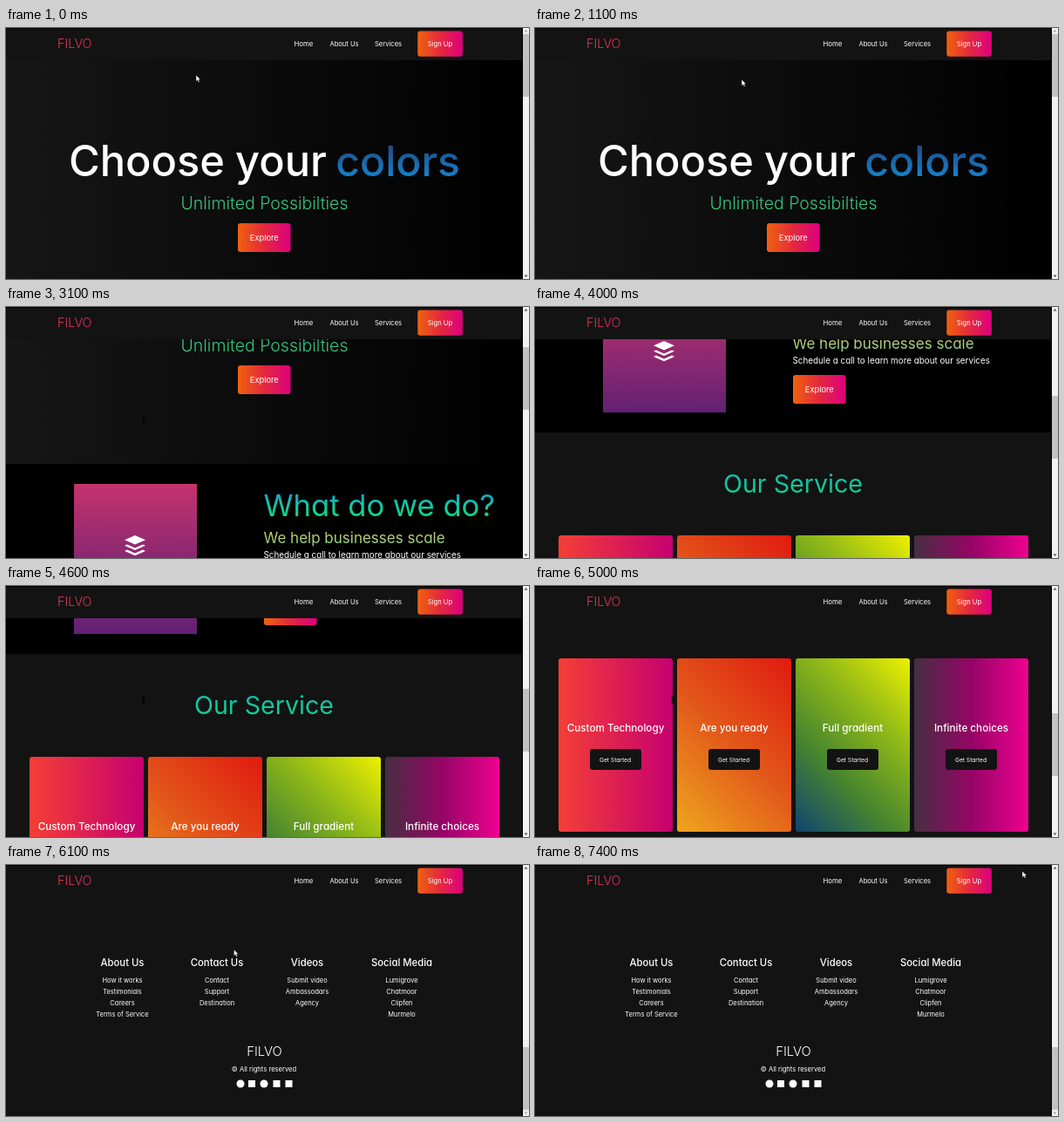
Recreate the animation shown at these times as an HTML page. Size 600 by 288 pixels, loop 7500 ms.

```html
<!DOCTYPE html>
<html lang="en">
<head>
<meta charset="utf-8">
<title>Choose your colors</title>
<style>
html, body { margin: 0; width: 100%; height: 100%; overflow: hidden; background: #131313; }
svg { display: block; width: 600px; height: 288px; }
text {
  font-family: Inter, "Open Sans", sans-serif;
  font-feature-settings: "cv11";
  font-optical-sizing: none;
  fill: #fff;
}
</style>
</head>
<body>
<svg id="stage" viewBox="0 0 600 288">
  <defs id="defs"></defs>
  <g id="page"></g>
  <g id="nav"></g>
  <g id="bar"></g>
  <g id="pan"><path d="M158 126l2 2.6h-4zM158 136l2-2.6h-4zM157.3 128h1.4v6h-1.4z" fill="#000"/></g>
  <path id="arrow" d="M0 0v7.2l1.7-1.5 1.1 2.5 1.3-.6-1.1-2.4h2.2z" fill="#fff" stroke="#000" stroke-width=".4"/>
</svg>
<script>
const LOOP = 7500, STEP = 100, VIEW = 288, PAGE = 1098;
const BRAND = 'FILVO';
const $ = id => document.getElementById(id);
const page = $('page'), nav = $('nav'), bar = $('bar');

function add(parent, tag, attrs, content) {
  const el = document.createElementNS('http://www.w3.org/2000/svg', tag);
  for (const k in attrs) el.setAttribute(k, attrs[k]);
  if (content) el.textContent = content;
  parent.appendChild(el);
  return el;
}

let gradCount = 0;
function gradient(colors, line) {
  const id = 'g' + gradCount++;
  const g = add($('defs'), 'linearGradient', { id, ...line });
  colors.forEach((c, i) => add(g, 'stop', { offset: i / (colors.length - 1), 'stop-color': c }));
  return `url(#${id})`;
}
const across = (...c) => gradient(c, { x1: 0, y1: 0, x2: 1, y2: 0 });
const down = (...c) => gradient(c, { x1: 0, y1: 0, x2: 0, y2: 1 });

// 45 degree gradient over a box, from bottom left to top right
function diagonal(x, y, w, h, ...c) {
  const d = (w + h) / 4, cx = x + w / 2, cy = y + h / 2;
  return gradient(c, {
    gradientUnits: 'userSpaceOnUse', x1: cx - d, y1: cy + d, x2: cx + d, y2: cy - d
  });
}

const rect = (parent, x, y, width, height, fill, rx = 0) =>
  add(parent, 'rect', { x, y, width, height, fill, rx });

function label(parent, str, x, y, size, { anchor = 'middle', weight = 400, fill } = {}) {
  const el = add(parent, 'text',
    { x, y, 'font-size': size, 'text-anchor': anchor, 'font-weight': weight }, str);
  if (fill) el.style.fill = fill;
}

const warm = across('#f0620e', '#e4283e', '#dc0080');
const left = { anchor: 'start' };

// Hero
rect(page, 0, 0, 592, 337, across('#161616', '#000'));
const hero = { weight: 500 };
label(page, 'Choose', 161.5, 169.5, 48.8, hero);
label(page, 'your', 315.5, 169.5, 48.8, hero);
label(page, 'colors', 449.7, 169.5, 48.2, { ...hero, fill: down('#25386e', '#1192e0') });
label(page, 'Unlimited Possibilties', 296.5, 208, 19.5, { weight: 300, fill: down('#2fb98c', '#3ccf76') });

function explore(x, y) {
  rect(page, x, y, 60.5, 33, warm, 3);
  label(page, 'Explore', x + 30.3, y + 20, 9.3);
}
explore(266, 224);

// What we do
rect(page, 0, 337, 592, 187, '#000');
rect(page, 78, 360, 141, 141, down('#c5336d', '#622074'));
const band = 'l3-1.4 9 4 9-4 3 1.4-12 5.3z';
add(page, 'path', {
  d: `M148 419l12 5.3-12 5.3-12-5.3zM136 430.8${band}M136 437${band}`, fill: '#fff'
});
label(page, 'What do we do?', 295.5, 397, 34.6, { ...left, fill: down('#2484dc', '#12c8a4', '#10e070') });
label(page, 'We help businesses scale', 295.5, 428, 17, { ...left, fill: down('#d9bd5c', '#86dc98') });
label(page, 'Schedule a call to learn more about our services', 295.5, 445, 9.85, left);
explore(296, 458);

// Services
rect(page, 0, 524, 592, PAGE - 524, '#131313');
label(page, 'Our Service', 296, 593, 28.6, { fill: down('#14b8b4', '#12d488') });
const CARD = { y: 642, w: 131, h: 199 };
const box = x => [x, CARD.y, CARD.w, CARD.h];
[
  ['Custom Technology', () => across('#f43f35', '#c60070')],
  ['Are you ready', x => diagonal(...box(x), '#eea61e', '#e2581a', '#e01a10')],
  ['Full gradient', x => diagonal(...box(x), '#0f4470', '#45842f', '#8fb818', '#eef000')],
  ['Infinite choices', () => across('#472f42', '#950566', '#ee0090')]
].forEach(([title, paint], i) => {
  const x = 27 + 136 * i, mid = x + 65.5;
  rect(page, ...box(x), paint(x), 3);
  label(page, title, mid, 726, 11.7, { weight: 500 });
  rect(page, mid - 29.5, 746, 59, 24, '#131313', 3);
  label(page, 'Get Started', mid - .5, 760.5, 6.7);
});

// Footer
[
  [133.5, 'About Us', 'How it works', 'Testimonials', 'Careers', 'Terms of Service'],
  [242, 'Contact Us', 'Contact', 'Support', 'Destination'],
  [345.5, 'Videos', 'Submit video', 'Ambassodars', 'Agency'],
  [454, 'Social Media', 'Lumigrove', 'Chatmoor', 'Clipfen', 'Murmelo']
].forEach(([x, head, ...items]) => {
  label(page, head, x, 926, 11.3, { weight: 500 });
  items.forEach((item, i) => label(page, item, x, 944.5 + 13.2 * i, 7.5));
});
label(page, BRAND, 296.5, 1028.5, 14.8, { weight: 300 });
label(page, '© All rights reserved', 296, 1047, 7.6);
[269, 282, 296, 310.5, 324.5].forEach((cx, i) => {
  if (i % 2 || i === 4) rect(page, cx - 4, 1057, 8, 8, '#fff');
  else add(page, 'circle', { cx, cy: 1061, r: 4.5, fill: '#fff' });
});

// Navigation
rect(nav, 0, 0, 592, 37, '#131313');
rect(nav, 0, 0, 592, 1, '#000');
label(nav, BRAND, 59, 23, 14.4, { ...left, weight: 300, fill: across('#e03a50', '#d82a64') });
label(nav, 'Home', 341.5, 21, 7.8);
label(nav, 'About Us', 388, 21, 7.6);
label(nav, 'Services', 438.5, 21, 7.6);
rect(nav, 472.3, 3.6, 51.6, 29.2, warm, 3);
label(nav, 'Sign Up', 498, 21, 7.6);

// Scrollbar
rect(bar, 592, 0, 1, VIEW, '#000');
rect(bar, 593, 0, 7, VIEW, '#f1f1f1');
const TRACK = 274;
const thumb = rect(bar, 593, 7, 7, TRACK * VIEW / PAGE, '#c1c1c1');
const up = add(bar, 'path', { d: 'M594.5 4.5l2-2.4 2 2.4z' });
const low = add(bar, 'path', { d: 'M594.5 283.5l2 2.4 2-2.4z' });

// time, scroll offset, speed in px per ms
const SCROLL = [
  [0, 0, 0], [2350, 0, 0], [3100, 157, .29], [4000, 380, .16],
  [4600, 446, .15], [5400, 714, .36], [5750, 810, 0], [LOOP, 810, 0]
];
// time, pointer tip
const POINTER = [
  [0, 218, 54], [1100, 237, 59], [1600, 214, 82], [2200, 158, 127],
  [5800, 158, 131], [6700, 557, 0], [7200, 559, 7], [LOOP, 559, 7]
];

function span(keys, t) {
  const i = keys.findIndex((k, n) => n && t < k[0]);
  const a = keys[i - 1], b = keys[i];
  return [a, b, (t - a[0]) / (b[0] - a[0])];
}

function scrollAt(t) {
  const [a, b, u] = span(SCROLL, t), dt = b[0] - a[0], w = 1 - u;
  return a[1] + (b[1] - a[1]) * u * u * (3 - 2 * u)
    + dt * (a[2] * u * w * w - b[2] * u * u * w);
}

function draw(t) {
  const s = Math.round(scrollAt(t));
  page.setAttribute('transform', `translate(0 ${-s})`);
  thumb.setAttribute('y', Math.round(7 + s * TRACK / PAGE));
  up.setAttribute('fill', s > 0 ? '#505050' : '#a3a3a3');
  low.setAttribute('fill', s < PAGE - VIEW ? '#505050' : '#a3a3a3');

  const panning = t >= 2300 && t < 5800;
  $('pan').setAttribute('visibility', panning ? 'visible' : 'hidden');
  $('arrow').setAttribute('visibility', panning ? 'hidden' : 'visible');
  const [a, b, u] = span(POINTER, t), e = u * u * (3 - 2 * u);
  $('arrow').setAttribute('transform',
    `translate(${a[1] + (b[1] - a[1]) * e} ${a[2] + (b[2] - a[2]) * e})`);
}

const start = performance.now();
function tick() {
  const t = (performance.now() - start) % LOOP;
  draw(Math.floor(t / STEP) * STEP);
  requestAnimationFrame(tick);
}
tick();
</script>
</body>
</html>
```
